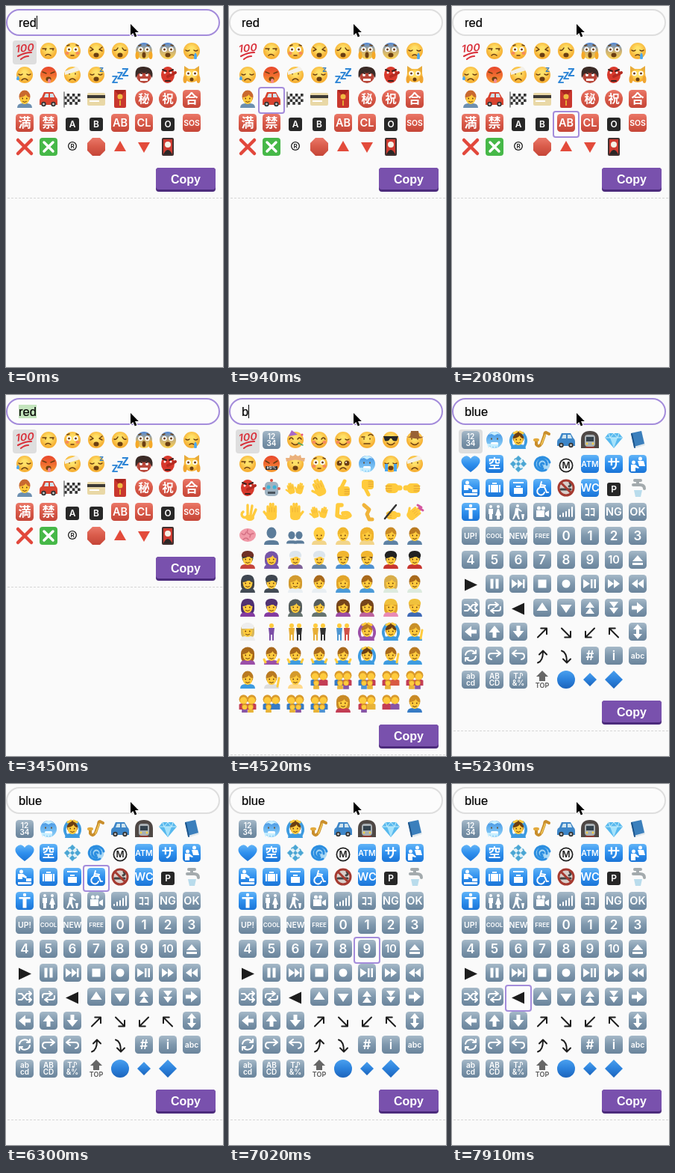
Write an HTML page that moves like this. It is 291 by 482 pixels and loops after 8000 ms.

```html
<!DOCTYPE html>
<html lang="en">
<meta charset="utf-8">
<title>Emoji search</title>
<style>
html, body { margin: 0; width: 100%; height: 100%; overflow: hidden; background: #fafafa; }
svg { display: block; }
text { font-family: "Liberation Sans", Arial, sans-serif; }
.icon text { font-family: Inter, "Noto Sans CJK JP", "Noto Sans CJK", "DejaVu Sans", sans-serif; font-weight: 600; text-anchor: middle; }
</style>
<svg width="291" height="482" viewBox="0 0 291 482">
  <defs id="defs">
    <radialGradient id="yellow" cy=".4"><stop offset=".3" stop-color="#ffe168"/><stop offset="1" stop-color="#f6b135"/></radialGradient>
    <clipPath id="view"><path d="M0 44h291v380H0z"/></clipPath>
  </defs>
  <rect id="field" x="1" y="5" width="285" height="34" rx="17" fill="#fcfcfc" stroke-width="2"/>
  <rect id="selection" x="17" y="13" width="24" height="18" fill="#c3e4bd"/>
  <text id="query" x="17" y="28" font-size="16.5" stroke="#000" stroke-width=".2"></text>
  <rect id="caret" y="13" width="1" height="18"/>
  <rect id="first" x="9" y="46" width="32" height="32" rx="4" fill="#dedede"/>
  <rect id="focus" width="34" height="34" rx="3" fill="#fcfcfc" stroke="#a48cdb" stroke-width="2"/>
  <g id="grid" clip-path="url(#view)"></g>
  <g id="footer">
    <rect x="201" width="80" height="32" rx="4" fill="#4c2b7c"/>
    <rect x="201" width="80" height="29" rx="4" fill="#7951ad"/>
    <text x="241" y="21" font-size="16" font-weight="bold" fill="#fff" text-anchor="middle">Copy</text>
    <path d="M2 40.5h289" stroke="#d6d6d6" stroke-dasharray="3 2"/>
  </g>
  <path d="M167 24v15l3.4-3 2.4 5.4 2.6-1.1-2.4-5.3h4.8z" stroke="#fff" stroke-width="2" paint-order="stroke"/>
</svg>
<script>
const $ = id => document.getElementById(id);
const brown = '#6b3f12', skin = '#ffcb3d', tearBlue = '#4aa8f0';

// Vertical gradients, used as url(#name).
const gradients = {
  gray: ['#a6b9c8', '#7f98ad', '#6a849b'], blue: ['#62b4f7', '#2f90ee', '#1a74d6'], red: ['#ea7868', '#d85a49', '#c54537'],
  chill: ['#4d86d8', '#c9b077', '#fbd04f'], heat: ['#e8472c', '#f06a30', '#f9a035'], ice: ['#3f8fe0', '#6bb6f0', '#8fd0f8'],
  ball: ['#4aa0ee', '#2c82dc', '#1c64bb']
};
$('defs').innerHTML += Object.entries(gradients).map(([id, colors]) => `<linearGradient id="${id}" x2="0" y2="1">` +
  colors.map((c, i) => `<stop offset="${i / 2}" stop-color="${c}"/>`).join('') + '</linearGradient>').join('');

// Shape helpers: every icon lives in a 24 unit square around 0,0.
const path = (d, fill) => `<path d="${d}" fill="${fill}"/>`;
const line = (d, color = brown, width = 1.5) =>
  `<path d="${d}" fill="none" stroke="${color}" stroke-width="${width}" stroke-linecap="round" stroke-linejoin="round"/>`;
const dot = (x, y, r, fill, ry = r) => `<ellipse cx="${x}" cy="${y}" rx="${r}" ry="${ry}" fill="${fill}"/>`;
const pair = (x, y, r, fill, ry) => dot(-x, y, r, fill, ry) + dot(x, y, r, fill, ry);
const box = (x, y, w, h, fill, r = 0) => `<rect x="${x}" y="${y}" width="${w}" height="${h}" rx="${r}" fill="${fill}"/>`;
const word = (s, size, fill, x = 0, y = 0) => `<text x="${x}" y="${y + size * .36}" font-size="${size}" fill="${fill}">${s}</text>`;
const at = (x, y, scale, body, turn = 0) => `<g transform="translate(${x} ${y}) scale(${scale}) rotate(${turn})">${body}</g>`;

// "name@turn": x and y mirror, a number rotates.
function turned(token, draw) {
  const [name, turn] = token.split('@');
  const move = turn === 'x' ? 'scale(-1 1)' : turn === 'y' ? 'scale(1 -1)' : `rotate(${turn || 0})`;
  return `<g transform="${move}">${draw(name)}</g>`;
}

const tile = (color, body) => box(-12, -12, 24, 24, `url(#${color})`, 4.5) + body;
const label = s => {
  const rows = s.split('/');
  return rows.length > 1
    ? word(rows[0], 10, '#fff', 0, -4.5) + word(rows[1], 10, '#fff', 0, 4.5)
    : word(s, [17, 14.5, 10.5, 8][s.length - 1], '#fff');
};

const solid = {
  play: 'M-8-8L9 0-8 8z', tri: 'M-4-7.5L7 0-4 7.5z', stop: 'M-5.5-5.5h11v11h-11z',
  rec: 'M-5.5 0a5.5 5.5 0 1 0 11 0a5.5 5.5 0 1 0-11 0', eject: 'M-7 2L0-6 7 2zM-7 4h14v3h-14z',
  pause: 'M-5.5-6.5h4v13h-4zM1.5-6.5h4v13h-4z', next: 'M-9-6L-1 0-9 6zM-1-6L6 0-1 6zM6-6h2.5v12h-2.5z',
  playpause: 'M-9-6L0 0-9 6zM1-6h2.5v12h-2.5zM5.5-6h2.5v12h-2.5z', fast: 'M-8-6L0 0-8 6zM0-6L8 0 0 6z',
  arrow: 'M-8-2.5h7v-5L8 0-1 7.5v-5h-7z', updown: 'M0-10l6 7h-4v6h4l-6 7-6-7h4v-6h-4z',
  man: 'M-2.2-8a2.2 2.2 0 1 0 4.4 0a2.2 2.2 0 1 0-4.4 0M-7.5-5h15v2.5h-5v12h-5v-12h-5z',
  toilets: 'M-7-7a2 2 0 1 0 4 0a2 2 0 1 0-4 0M-8-4h6v7h-1v7h-4v-7h-1zM3-7a2 2 0 1 0 4 0a2 2 0 1 0-4 0M4-4h2l3 9h-2v5h-4v-5h-2z',
  litter: 'M-3-8a2 2 0 1 0 4 0a2 2 0 1 0-4 0M-4-5h4l5 4-1 1-4-2v5l2 7h-2l-3-6-3 6h-2l3-8zM4 3h4l-1 7h-2z',
  passport: 'M1-7a2.5 2.5 0 1 0 5 0a2.5 2.5 0 1 0-5 0M0-4h8l2 7h-8zM-8-2a2.5 2.5 0 1 0 5 0a2.5 2.5 0 1 0-5 0M-9 1h6l5 4-1 1-4-1v5h-6z',
  customs: 'M-7-7a2.5 2.5 0 1 0 5 0a2.5 2.5 0 1 0-5 0M-9-4h7l5 4-1 2-5-2v3h-6zM2 2h7v4h-7zM-9 7h18v3h-18z',
  luggage: 'M-8-4h2v10h-2zM-5-4h10v10h-10zM6-4h2v10h-2zM-3-7h6v2h-6z',
  locker: 'M-6 0h12v8h-12zM-3-3h6v2h-6zM-7-8h14v2h-14z',
  cinema: 'M-8-2h11v9h-11zM4 1l5-3v9l-5-3zM-7-5a2.5 2.5 0 1 0 5 0a2.5 2.5 0 1 0-5 0M-1-5a2.5 2.5 0 1 0 5 0a2.5 2.5 0 1 0-5 0'
};
const strokes = {
  thin: 'M-8.5 0H8.5M3-5.5L8.5 0 3 5.5', bend: 'M-6 8q7-2 7-15M-4-3L1-8 6-3',
  shuffle: 'M-8-4h4l7 8h5M-8 4h4l7-8h5M6-7l3 3-3 3M6 1l3 3-3 3',
  loop: 'M-8 1v-2q0-3 3-3h9M1-7l4 3-4 3M8-1v2q0 3-3 3h-9M-1 1l-4 3 4 3',
  sync: 'M-7-1a7 7 0 0 1 13-2M7-7v4h-4M7 1a7 7 0 0 1-13 2M-7 7v-4h4',
  hook: 'M-4 5q-4-1-4-4 0-4 4-4h11M3-7l5 4-5 4',
  chair: 'M-1-8l-2 7h6l3 7h2M-2-4l6 1M-4 0a5 5 0 1 0 7 6', bars: 'M-8 6v-1M-4 6v-4M0 6v-6M4 6v-9M8 6v-12'
};
const glyph = (token, color) => turned(token, name => solid[name] ? path(solid[name], color) : line(strokes[name], color, 2));

// Faces: stroke outline, overlay, skin.
const blush = pair(7, 3, 2.6, '#f68a5c', 2);
const wide = pair(4.5, -2, 3.2, '#fff') + pair(4.5, -2, 1.5, brown);
const closed = 'M-8-1q2.5 2 5 0M3-1q2.5 2 5 0', happy = 'M-8-1q2.5-4 5 0M3-1q2.5-4 5 0', smile = 'M-5 4q5 5 10 0';
const open = dot(0, 5.5, 3.5, brown, 3), frown = 'M-4 7q4-4 8 0', eyes = 'M-4-2v1M4-2v1';
const tear = (x, y) => path(`M${x} ${y}q-4 6 0 6q4 0 0-6z`, tearBlue);
const faces = {
  unamused: ['M-8-3h5M2-3h5M-4-2v1M6-2v1M-4 6q3-3 7 0'],
  flushed: ['M-7-7l3-1M8-7l-3-1M-2 6h4', blush + wide],
  tired: ['M-8-5l4 3-4 2M8-5l-4 3 4 2', open],
  weary: ['M-8-1q3 1 5-3M8-1q-3 1-5-3', open],
  scream: ['M-7-7l3-1M7-7l-3-1', wide + dot(0, 5.5, 2.5, brown, 4) + pair(9, 6, 2.5, '#f5a928', 5), 'url(#chill)'],
  fearful: ['M-7-7l3-1M7-7l-3-1', wide + open, 'url(#chill)'],
  sleepy: [closed + 'M-3 6q3-2 6 0', tear(5, 2) + tear(5, 5)],
  sweat: [closed + frown, tear(-9, 1)],
  hot: ['M-8-4l5 2M8-4l-5 2', open + dot(1, 8, 2, '#f58b91', 3), 'url(#heat)'],
  bandage: [eyes + frown, path('M-10-5L6-11l4 5-20 6z', '#f3f0e8')],
  sleeping: [closed, open + word('z', 11, '#317bc0', 7, -8)],
  smile: [happy + smile, blush], relaxed: [closed + smile, blush], raised: [eyes + 'M-7-4h4M2-6q3-3 6 0M-4 5h8'],
  cool: [smile, path('M-10-5h20l-2 6q-5 2-7-3h-2q-2 5-7 3z', '#272727')],
  cowboy: [eyes + smile, path('M-12-5q4 2 6 0l1-7h10l1 7q3 2 6 0q-3 4-12 3t-12-3z', '#986235')],
  cursing: ['M-8-4l5 3M8-4l-5 3', box(-8, 3, 16, 5, '#333', 1) + word('#$!%', 5, '#fff', 0, 5.5), 'url(#heat)'],
  exploding: [eyes, open + path('M-12-3l-1-5 5 0 1-4 4 2 3-3 3 3 4-2 1 4 5 0-1 5q-12-5-24 0z', '#eab07c')],
  pleading: [frown, pair(5, -1, 3.5, brown) + pair(4, -2, 1, '#fff')],
  cold: [eyes, box(-5, 3, 10, 4, '#fff', 1.5) + path('M-10 5l2 6 2-4 2 5 2-4 2 4 2-4 2 3 1-5zM-8-7q8-8 16 0l-4-1-4 2-4-2z', '#c8efff'), 'url(#ice)'],
  sob: [closed, open + path('M-8 0h4v10h-4zM4 0h4v10h-4z', tearBlue)],
  party: [happy + smile, path('M-9-5L-5-13 3-7z', '#a767ca') + line('M4 4l6 3', '#4ba860') + dot(9, -7, 1.5, '#e6557c')]
};
const hat = color => color ? path('M-8-4q-1-8 8-8t8 8z', color) : '';
const head = hair => dot(0, -3, 7.5, hair, 8.5) + path('M-6.500-2q7-1 8-4q2 4 5 4v1q-1 8-6.500 8t-6.500-8z', skin) +
  pair(2.8, -.5, .9, brown) + line('M-2.500 3.500q2.500 2 5 0', brown, 1);
const body = shirt => path('M-10 12q0-6 7-6h6q7 0 7 6z', shirt);
const person = (hair, shirt, cap) => body(shirt) + head(hair) + hat(cap);
const child = (x, y, size, color) => at(x, y, size, path('M-7 14v-8q7-5 14 0v8z', color) + dot(0, -2, 7, '#d99a2b') + dot(0, 0, 5.5, skin));
const palm = box(-7, -2, 14, 13, skin, 5) + line('M-5 1v-8M-1.5 0v-10.500M2 0v-10.500M5.5 1v-8M-6 5l-4-5', skin, 3.4) + line('M-3 0v-5M.3 0v-6M3.8 0v-5', '#e8a52f', .7);
const fist = box(-7, -6, 17, 13, skin, 5) + line('M-7-2.500h8M-7 1h8M-6 4h7', '#de9c2e', 1) + line('M7 0h5', skin, 7);

const kinds = {
  gray: s => tile('gray', label(s)), blue: s => tile('blue', label(s)), red: s => tile('red', label(s)),
  key: s => tile('gray', glyph(s, '#fff')), sign: s => tile('blue', glyph(s, '#fff')),
  mark: s => at(0, 1.5, 1, glyph(s, '#1d1d1d')),
  dark: s => box(-9, -7, 18, 18, '#272727', 3) + word(s, 12, '#fff', 0, 2),
  seal: s => dot(0, 0, 12, 'url(#red)') + word(s, 15, '#fff'),
  face: s => { const [d, over = '', fill = 'url(#yellow)'] = faces[s]; return dot(0, 0, 11, fill) + line(d) + over; },
  man: s => person(...s.split(',')),
  woman: s => { const [hair, ...rest] = s.split(','); return box(-9, -11, 18, 21, hair, 8) + person(hair, ...rest); },
  arms: s => { const [hair, shirt] = s.split(','); return person(hair, shirt) + line('M-7 10Q-14 0-6-9M7 10Q14 0 6-9', shirt, 3.5) + line('M-6-9l4-2M6-9l-4-2', skin, 3); },
  shrug: s => person(...s.split(',')) + line('M-8 9l-2-4M8 9l2-4', skin, 3),
  wave: s => person(...s.split(',')) + line('M8 9L10-2', skin, 3),
  family: s => s.split(',').map((c, i) => child([-5.5, 5.5, -4, 4][i], i < 2 ? -4 : 5, i < 2 ? .85 : .55, c)).join(''),
  dancers: s => s.split(',').map((c, i, all) => at(i * 10 - 5 * (all.length - 1), 0, 1, dot(0, -8, 3, skin) + path('M-4-5h8l-1 9h-6z', c) + line('M-2 4v7M2 4v7', c, 2))).join(''),
  hundred: () => `<g transform="skewX(-12) rotate(-6)">${word('100', 14, '#d9303a', 0, -4)}</g>` + line('M-9 7q9-5 18-5M-5 11q5-4 10-4', '#d9303a', 2.2),
  zzz: () => word('z', 17, '#2f86d6', -7, 5) + word('z', 17, '#2f86d6') + word('z', 19, '#2f86d6', 7, -5),
  ogre: () => dot(0, 1, 10, '#b8473a') + path('M-11 4q-3-16 11-15t11 15l-3-5-4-3-4 2-4-2-4 3z', '#3b2b27') + pair(4, 0, 2, '#fff') + box(-5, 5, 10, 3, '#fff') + line('M-7-4l4 2M7-4l-4 2', '#3b2b27', 2),
  goblin: () => dot(0, 0, 9, '#d8392c', 11) + line('M0 2l10-5', '#b52a20', 4) + pair(4, -3, 1.5, '#fff') + line('M-7-7l5 2M7-7l-5 2M-3 8h6', '#3c211d', 2),
  cat: () => path('M-10-2v-10l6 4h8l6-4v10z', '#e8ab39') + dot(0, 1, 10.5, 'url(#yellow)', 9) + wide + dot(0, 6, 2.5, brown) + pair(9, 6, 2.5, '#f0a530', 5),
  car: c => path('M-12 3q0-4 3-5l3-7h12l4 7q2 1 2 5v5h-24z', c) + path('M-6-2l2-5h4v5zM2-7h4l2 5h-6z', '#cfe4ee') + pair(6.5, 7, 3.2, '#333') + pair(6.5, 7, 1.4, '#ccc'),
  flag: () => box(-11, -7, 22, 15, '#fff') + [...Array(24).keys()].map(i => i + (i / 6 | 0) & 1 ? box(i % 6 * 3.6 - 11, (i / 6 | 0) * 3.7 - 7, 3.6, 3.7, '#333') : '').join('') + line('M-11-9v20', '#777', 1.5),
  card: () => box(-12, -8, 24, 17, '#e9d8a6', 2) + box(-12, -5, 24, 4, '#3c3935') + box(-9, 2, 13, 2, '#fff'),
  envelope: () => box(-8, -12, 16, 24, '#c9372e', 2) + path('M-8-12h16l-8 9z', '#a9251f') + dot(0, -3, 3.5, '#f0b942') + box(-1, 2, 2, 7, '#e4a735'),
  cross: () => line('M-9-9L9 9M9-9L-9 9', '#e2473b', 4.5),
  check: () => box(-12, -12, 24, 24, '#46b848', 4) + line('M-6-6L6 6M6-6L-6 6', '#fff', 3.5),
  ring: s => dot(0, 2, 9.5, '#1d1d1d') + dot(0, 2, 7.8, '#fafafa') + word(s, 12, '#1d1d1d', 0, 2),
  registered: () => dot(0, -1, 6, '#1d1d1d') + dot(0, -1, 4.7, '#fafafa') + word('R', 8, '#1d1d1d', 0, -1),
  octagon: () => path('M-5-12h10l7 7v10l-7 7h-10l-7-7v-10z', 'url(#red)'),
  disc: () => dot(0, 0, 12, 'url(#ball)'), rhomb: r => path(`M0-${r}L${r} 0 0 ${r}-${r} 0z`, 'url(#ball)'),
  peak: () => path('M0-8L8 6h-16z', '#e34b3b'),
  flower: () => box(-8, -12, 16, 24, '#42302f', 2) + box(-6, -10, 12, 20, '#cf3b31') + dot(0, -3, 4, '#f6f1e6') + path('M-6 10q6-12 12 0z', '#2b2726'),
  robot: () => box(-9, -8, 18, 19, '#9fb3c2', 5) + pair(4, -1, 2.5, '#3eb3d8') + box(-5, 5, 10, 3, '#4a555f') + dot(0, -10, 2, '#dc4c41') + pair(10, 1, 2, '#d65b50'),
  hand: () => palm, hands: () => at(-6, 1, .65, palm, -15) + at(6, 1, .65, palm, 15),
  thumb: () => box(-7, -2, 16, 13, skin, 4) + line('M-3 1l5-10', skin, 5) + line('M2 2h6M2 5h6M2 8h6', '#de9c2e', 1), fist: () => fist,
  ok: () => line('M-6 0a4 4 0 1 0 6 4M0 3v-12M4 4l2-12M7 6l4-9', skin, 3.4) + dot(3, 8, 6, skin, 4),
  muscle: () => line('M-2-9h-5l-1 14q10 5 17 0-2-5-9-3', skin, 5.5),
  leg: () => line('M-4-9l7 6-3 6 3 7h4', '#f0b43a', 5),
  write: () => at(0, 4, .85, fist) + line('M-8 9L7-9', '#333', 2.5),
  nails: () => at(-1, 2, .9, palm, 50) + line('M4-9l5 3M6-5l5 3', '#d457a0', 3),
  brain: () => dot(0, -1, 11, '#f19aa8', 9) + line('M-8-3q4 4 6-2M0-8q-2 5 3 6M8-3q-5 0-5 5M-6 5q4-4 7 0', '#d46f83'),
  bust: () => dot(0, -4, 6.5, '#5b7c9a', 7.5) + body('#5b7c9a'), busts: () => at(-5, 2, .7, kinds.bust()) + at(5, 2, .7, kinds.bust()),
  sax: () => line('M9-8l-4-2q-2 0-2 4l-4 11q-4 6-7 1v-5', '#c98e2c', 4) + line('M4-7l-5 13', '#f3cc5c', 1.5) + dot(-8, 0, 4, '#e2a93b', 2.2),
  metro: () => path('M-12 11v-11q0-12 12-12t12 12v11z', '#4f4845') + box(-7, -7, 14, 16, '#a9b0b4', 4) + box(-5, -4, 10, 6, '#34424d') + pair(4, 5, 1.4, '#f5d24a') + box(-6, 9, 12, 2, '#8c3b32'),
  gem: () => path('M-7-9h14l5 6-12 14-12-14z', '#58b9ee') + path('M-5-3h10l-5 14z', '#a5e2fb') + line('M-11-3h22M-7-9l2 6 5-6 5 6 2-6', '#c9effc', 1),
  book: () => path('M-8-9L5-12 10 7-3 11z', '#dfe7ec') + path('M-9-9L5-12 9 5-5 9z', '#3b7fbc') + line('M-8-8l4 18', '#1e568c', 2),
  heart: () => path('M0 11q-17-12-11-19q6-6 11 1q5-7 11-1q6 7-11 19z', 'url(#blue)'),
  diamonds: () => path('M0-12L12 0 0 12-12 0z', '#e2f1f6') + [0, 90, 180, 270].map(a => at(0, 0, 1, path('M0-11l4 4-4 4-4-4zM5-5l1-1 2 2-1 1z', '#4ba6d4'), a)).join('') + path('M0-3L3 0 0 3-3 0z', '#4ba6d4'),
  swirl: () => dot(0, 0, 10.5, '#a9d8f5') + line('M10-2a10 9 0 1 0-5 10M6 1a6 6 0 1 0-5 5M2 0a2 2 0 1 0-2 3', '#2c8ee0', 3),
  nosmoke: () => dot(0, 0, 11, '#d9cfca') + line('M-7 2h13M4-2q4-1 1-5', '#444', 3) + line('M-7-7L7 7M-10 0a10 10 0 1 1 20 0a10 10 0 1 1-20 0', '#a53a30', 3),
  tap: () => line('M-6-4h9q6 0 6 5M0-4v-5M-4-10h8', '#a3aaad', 4) + path('M-5 3h11l-2 9h-7z', '#b9dcec'),
  top: () => path('M0-12l8 8h-4v6h-8v-6h-4z', '#666') + word('TOP', 9, '#555', 0, 7.5)
};

const shared = `sax car:#3d86c8 metro gem book heart blue:空 diamonds swirl ring:M blue:ATM blue:サ
  sign:passport sign:customs sign:luggage sign:locker sign:chair nosmoke blue:WC dark:P tap sign:man key:toilets key:litter key:cinema key:bars
  gray:ｺｺ gray:NG gray:OK gray:UP! gray:COOL gray:NEW gray:FREE gray:0 gray:1 gray:2 gray:3 gray:4 gray:5 gray:6 gray:7 gray:8 gray:9 gray:10
  key:eject mark:play key:pause key:next key:stop key:rec key:playpause key:fast key:fast@180 key:shuffle key:loop mark:play@x
  key:tri@-90 key:tri@90 key:fast@-90 key:fast@90 key:arrow key:arrow@180 key:arrow@-90 key:arrow@90
  mark:thin@-45 mark:thin@45 mark:thin@135 mark:thin@-135 key:updown key:sync key:hook key:hook@x mark:bend mark:bend@y
  gray:# gray:i gray:abc gray:ab/cd gray:AB/CD gray:T♪/&amp;% top disc rhomb:9 rhomb:12`;
const arms = 'arms:#6b3f12,#3d9be0';
const split = s => s.trim().split(/\s+/);
const lists = {
  red: split(`hundred face:unamused face:flushed face:tired face:weary face:scream face:fearful face:sleepy
    face:sweat face:hot face:bandage face:sleeping zzz ogre goblin cat man:#c9692f,#6c8fb0 car:#d8432f flag card envelope seal:秘 seal:祝 red:合
    red:満 red:禁 dark:A dark:B red:AB red:CL dark:O red:SOS cross check registered octagon peak peak@y flower`),
  b: split(`hundred gray:12/34 face:party face:smile face:relaxed face:raised face:cool face:cowboy
    face:unamused face:cursing face:exploding face:flushed face:pleading face:cold face:sob face:bandage
    goblin robot hands hand@-25 thumb thumb@y fist fist@x ok hand hand@x hands muscle leg write nails
    brain bust busts man:#ffcb3d,#f2d58a man:#efb62e,#f2d58a woman:#f0b32d,#f2d58a man:#c98a26,#5d82a5 man:#b97a22,#5d82a5
    man:#333,#c4443c,#6f3026 woman:#7655a8,#7655a8 man:#eee,#7d6097,#dce5ec man:#eee,#6688a6,#dce5ec man:#765018,#4f91d0,#f1b52e man:#765018,#4f91d0,#f1b52e man:#222,#c7362f,#222 man:#222,#c7362f,#222
    woman:#444,#424b55,#3f4650 man:#444,#424b55,#3f4650 woman:#d39b2f,#e8eef2 man:#a8691c,#e8eef2 woman:#e2a52a,#4b9ad8 man:#a8691c,#4b9ad8 woman:#d8ad4a,#dceade man:#a8691c,#dceade
    woman:#4b2d73,#833ba0,#513271 man:#4b2d73,#833ba0,#513271 woman:#555d5c,#65736f man:#555d5c,#65736f woman:#76451b,#9c4da4 woman:#76451b,#bd629d woman:#e2a52a,#e98ab5,#f0c13c man:#d79a2c,#3e69b5,#f0c13c
    woman:#d8b75c,#eee,#eee dancers:#7b4da5 dancers:#e7ae35,#333 dancers:#e7ae35,#333 dancers:#4d96d2,#cf5148 arms:#b97a22,#9b4fa8 ${arms} wave:#c99028,#3d9be0
    woman:#a8691c,#9b4fa8 shrug:#a8691c,#9b4fa8 shrug:#a8691c,#3d9be0 shrug:#a8691c,#3d9be0 shrug:#a8691c,#3d9be0 ${arms} wave:#a8691c,#3d9be0 man:#b97a22,#3d9be0
    man:#b97a22,#3d9be0 wave:#b97a22,#ddd man:#d49a2c,#ffd98a family:#367bc5,#c33d54,#e8b338 family:#367bc5,#c33d54,#e8b338,#8855a5 family:#367bc5,#c33d54,#4f93d2,#e8b338 family:#c33d54,#d85a42,#e8b338 family:#c33d54,#c33d54,#e8b338,#8855a5
    family:#c33d54,#c33d54,#8855a5,#e8b338 family:#367bc5,#367bc5,#e8b338 family:#367bc5,#367bc5,#e8b338,#8855a5 family:#367bc5,#367bc5,#e8b338,#4f93d2 woman:#c98a26,#c33d54 family:#c33d54,#e8b338,#8855a5 family:#c33d54,#8855a5 man:#c98a26,#367bc5`),
  blue: split(`gray:12/34 face:cold ${arms} ${shared}`),
  blu: split(`gray:12/34 face:smile face:relaxed face:flushed face:cold ${arms} ${shared}`)
};
lists.bl = [...lists.blu.slice(0, 6), ...lists.b.slice(32, 40), ...lists.blu.slice(6)];

function icon(token, i) {
  const [kind, arg] = token.split(':');
  return at(25 + i % 8 * 32, 60 + (i >> 3) * 32, 1, turned(kind, name => kinds[name](arg)));
}
$('grid').innerHTML = Object.entries(lists).map(([q, list]) => `<g class="icon" id="list-${q}">${list.map(icon).join('')}</g>`).join('');

// Timeline: typing states and arrow-key walks over the grid ("0" enters at the first cell).
const steps = [{ t: 0, query: 'red', caret: true }];
let col = 0, row = 0;
function walk(query, start, end, moves) {
  [...moves].forEach((m, i) => {
    if (m === '0') col = row = 0;
    col += (m === 'r') - (m === 'l');
    row += (m === 'd') - (m === 'u');
    steps.push({ t: start + (end - start) * i / (moves.length - 1), query, cell: [col, row] });
  });
}
walk('red', 180, 1180, '0ddrrr');
walk('red', 1420, 2080, 'rrdl');
walk('red', 2560, 3272, 'lluuu');
steps.push({ t: 3450, query: 'red', selected: true });
['b', 'bl', 'blu', 'blue'].forEach((query, i) => steps.push({ t: 4520 + i * 60, query, caret: true }));
steps.push({ t: 5230, query: 'blue' });
walk('blue', 5396, 6060, '0ddrr');
walk('blue', 6300, 6360, 'rr');
walk('blue', 6516, 7140, 'rdddd');
walk('blue', 7440, 7910, 'dlll');

const show = (id, on) => $(id).style.display = on ? '' : 'none';
const set = (id, attrs) => Object.entries(attrs).forEach(([k, v]) => $(id).setAttribute(k, v));
let current;
function frame() {
  const t = performance.now() % 8000, step = steps.findLast(s => s.t <= t);
  if (step !== current) {
    current = step;
    const { query, cell, caret, selected } = step;
    $('query').textContent = query;
    set('field', { stroke: cell ? '#dedede' : '#a48cdb' });
    set('caret', { x: Math.round(17 + $('query').getComputedTextLength()) });
    show('caret', caret);
    show('selection', selected);
    show('first', !cell);
    show('focus', cell);
    if (cell) set('focus', { x: 8 + cell[0] * 32, y: 45 + cell[1] * 32 });
    for (const q in lists) show('list-' + q, q === query);
    const rows = Math.min(12, Math.ceil(lists[query].length / 8));
    set('footer', { transform: `translate(0 ${56 + rows * 32})` });
  }
  requestAnimationFrame(frame);
}
frame();
</script>
</html>
```
